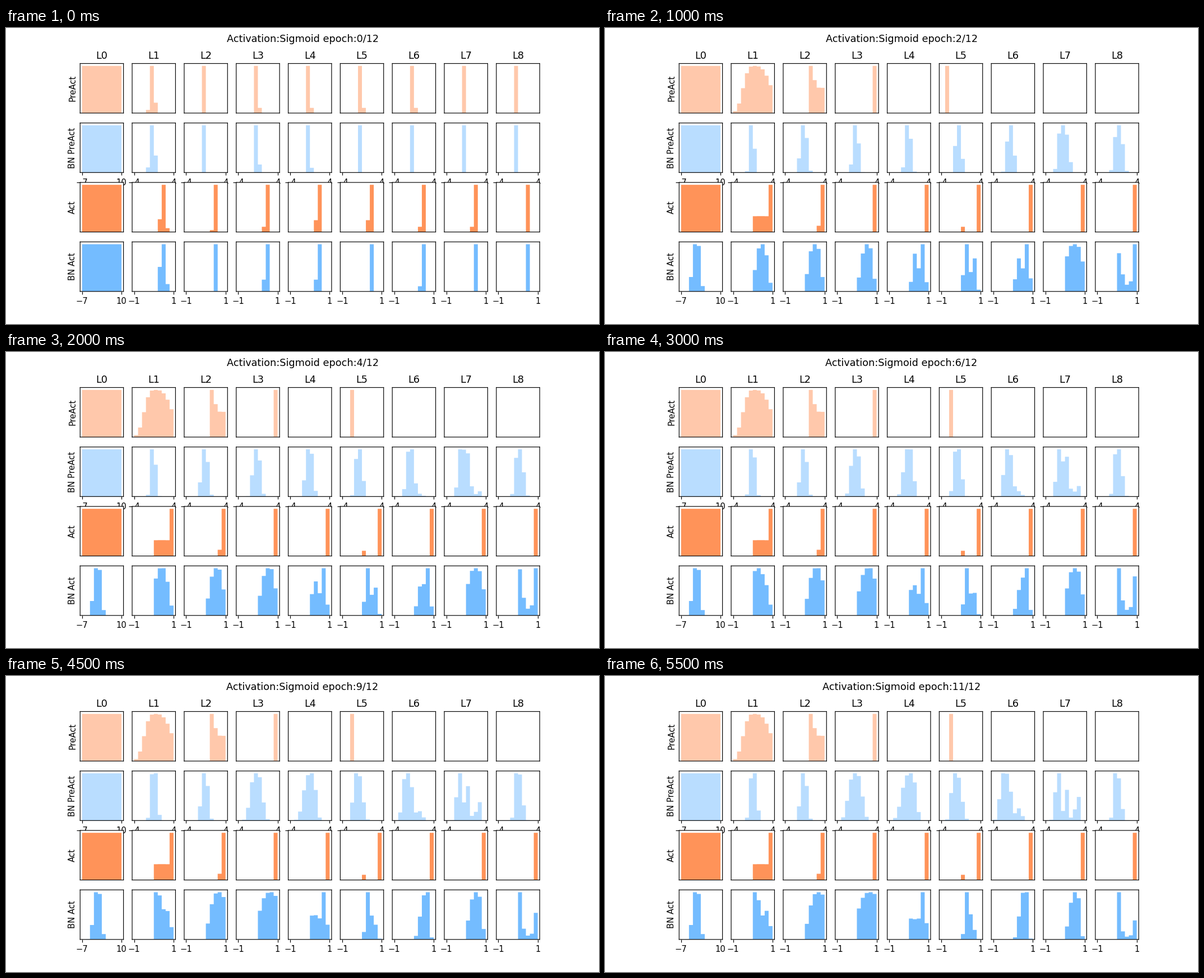
These frames come from a looping animation (1058 by 529 pixels, 6000 ms). A matplotlib script:

```python
import matplotlib.pyplot as plt
import numpy as np
from matplotlib.animation import FuncAnimation

EPOCHS = 12
BINS = 10
LAYERS = 9
PRE, BN_PRE, ACT, BN_ACT = range(4)
ROWS = ["PreAct", "BN PreAct", "Act", "BN Act"]
ORANGE, BLUE = "#FF9359", "#74BCFF"
K = np.arange(BINS)

# Share of values beside the central spike before training, for L1 to L8
LEAK = {
    PRE: [0.22, 0, 0.11, 0.11, 0.11, 0.11, 0, 0],
    BN_PRE: [0.36, 0, 0.17, 0.1, 0, 0, 0, 0],
    ACT: [0.27, 0.04, 0.11, 0.25, 0.25, 0.11, 0.11, 0],
    BN_ACT: [0.52, 0, 0.25, 0.25, 0, 0.11, 0, 0],
}

shapes = {}


def bump(early, late=None):
    """Flat-topped bump (centre, left width, right width, height=1) that drifts."""
    poses = [p if len(p) == 4 else (*p, 1) for p in (early, late or early)]
    return np.array(poses, float)


def shape(row, layer, *bumps):
    shapes[row, layer] = bumps


def spike(row, layer):
    """Weights near zero: one bin holds almost everything."""
    h = np.zeros(BINS)
    centre, side = (4, 1) if row in (PRE, BN_PRE) else (7, -1)
    leak = LEAK[row][layer - 1]
    h[centre] = 1
    h[centre + side] = leak
    if layer == 1:
        h[centre - side] = 0.3 * leak
    return h


def heights(row, layer, epoch):
    if layer == 0 and (epoch == 0 or row != BN_ACT):
        return np.ones(BINS)
    if epoch == 0:
        return spike(row, layer)
    u = np.clip((epoch - 2) / (EPOCHS - 3), 0, 1)
    h = np.zeros(BINS)
    for early, late in shapes.get((row, layer), ()):
        centre, left, right, height = early + (late - early) * u
        d = K - centre
        h += height * np.exp(-np.abs(d / np.where(d < 0, left, right)) ** 3)
    if row in (ACT, BN_ACT) and layer:
        h[:BINS // 2] = 0  # a sigmoid is never negative
    return h / h.max() if h.any() else h


# Plain network: saturates at once
edge = bump((9, 0.4, 0.4))
shape(PRE, 1, bump((4.8, 3.25, 5.2)))
shape(PRE, 2, bump((6, 0.5, 1.05)), bump((8.3, 1.5, 3, 0.55)))
shape(PRE, 3, edge)
shape(PRE, 5, bump((1.3, 0.2, 0.2), (2.4, 0.2, 0.2)))
for layer in range(1, LAYERS):
    shape(ACT, layer, edge)
shape(ACT, 1, edge, bump((6.5, 9, 9, 0.5)))
shape(ACT, 2, bump((9, 0.79, 0.79)))
shape(ACT, 5, edge, bump((5, 0.4, 0.4, 0.11)))

# Batch-normalised network: keeps drifting
shape(BN_PRE, 1, bump((4.1, 0.72, 1.02), (4.6, 1.13, 1.2)))
shape(BN_PRE, 2, bump((4.15, 1.08, 1.25)))
shape(BN_PRE, 3, bump((4.15, 0.95, 1.08), (4.2, 2.3, 2.05)))
shape(BN_PRE, 4, bump((4.2, 0.92, 1.14), (5, 2.8, 1.67)))
shape(BN_PRE, 5, bump((3.85, 1.02, 1.07), (3.1, 1.35, 1.95)))
shape(BN_PRE, 6, bump((3.9, 1.2, 1.09), (2.4, 1.5, 2)),
      bump((6, 0.9, 0.9, 0), (6.1, 0.9, 0.9, 0.25)))
shape(BN_PRE, 7, bump((3.2, 0.9, 0.9), (3, 1.25, 0.8)),
      bump((4.8, 1.2, 1.1), (5, 0.75, 0.75, 0.65)),
      bump((8, 1.1, 0.6, 0), (8, 1.1, 0.6, 0.5)))
shape(BN_PRE, 8, bump((4.85, 1.29, 1.44), (4.2, 0.85, 1.6)))

shape(BN_ACT, 0, bump((3.5, 1.4, 1.15)))
shape(BN_ACT, 1, bump((6.2, 1.35, 1.75), (5, 2, 1.75)),
      bump((8, 1, 1, 0.5), (8, 1.1, 1.1, 0.6)))
shape(BN_ACT, 2, bump((7.2, 2.2, 1.7), (8, 2.9, 2.7)))
shape(BN_ACT, 3, bump((7.3, 2.15, 1.55), (8, 4, 3)))
shape(BN_ACT, 4, bump((6, 0.9, 1, 0.8), (5.5, 2, 1.4, 0.45)),
      bump((8, 0.85, 0.85), (8, 0.95, 0.98)))
shape(BN_ACT, 5, bump((6, 0.98, 0.95), (6.1, 0.85, 1.02)),
      bump((8, 0.8, 0.7, 0.7), (8, 0.8, 0.7, 0.2)))
shape(BN_ACT, 6, bump((6, 1, 0.9, 0.7), (6, 0.8, 1, 0.3)),
      bump((8, 0.95, 0.92), (7.8, 1.5, 0.75)))
shape(BN_ACT, 7, bump((7, 3, 2.6), (7.4, 2.2, 1.15)))
shape(BN_ACT, 8, bump((5, 1, 0.95, 0.8), (5, 1, 0.78)),
      bump((7, 2, 2, 0.15), (7, 2, 2, 0.06)),
      bump((9, 0.75, 0.75), (9, 0.75, 0.75, 0.39)))

plt.rcParams["path.snap"] = False
fig, axes = plt.subplots(4, LAYERS, figsize=(10, 5), dpi=105.8)
title = fig.suptitle("")
hists = {}

for (row, layer), ax in np.ndenumerate(axes):
    before_act = row in (PRE, BN_PRE)
    normed = row in (BN_PRE, BN_ACT)
    span = 4 if before_act else 1
    lo, hi = (-7, 10) if layer == 0 else (-span, span)
    hists[row, layer] = ax.stairs(
        np.zeros(BINS), np.linspace(lo, hi, BINS + 1), fill=True,
        facecolor=BLUE if normed else ORANGE, edgecolor="none",
        alpha=0.5 if before_act else 1)
    ax.set_yticks([])
    ax.set_xticks([lo, hi] if normed else [])
    pad = 0.05 * (hi - lo)
    ax.set_xlim(lo - pad, hi + pad)
    ax.set_ylim(0, 1.05)
    if row == 0:
        ax.set_title(f"L{layer}")
    if layer == 0:
        ax.set_ylabel(ROWS[row])


def draw(epoch):
    title.set_text(f"Activation:Sigmoid epoch:{epoch}/{EPOCHS}")
    for panel, hist in hists.items():
        hist.set_data(heights(*panel, epoch))


anim = FuncAnimation(fig, draw, frames=EPOCHS, interval=500,
                     init_func=lambda: draw(0), repeat=True, repeat_delay=0)
plt.show()
```
